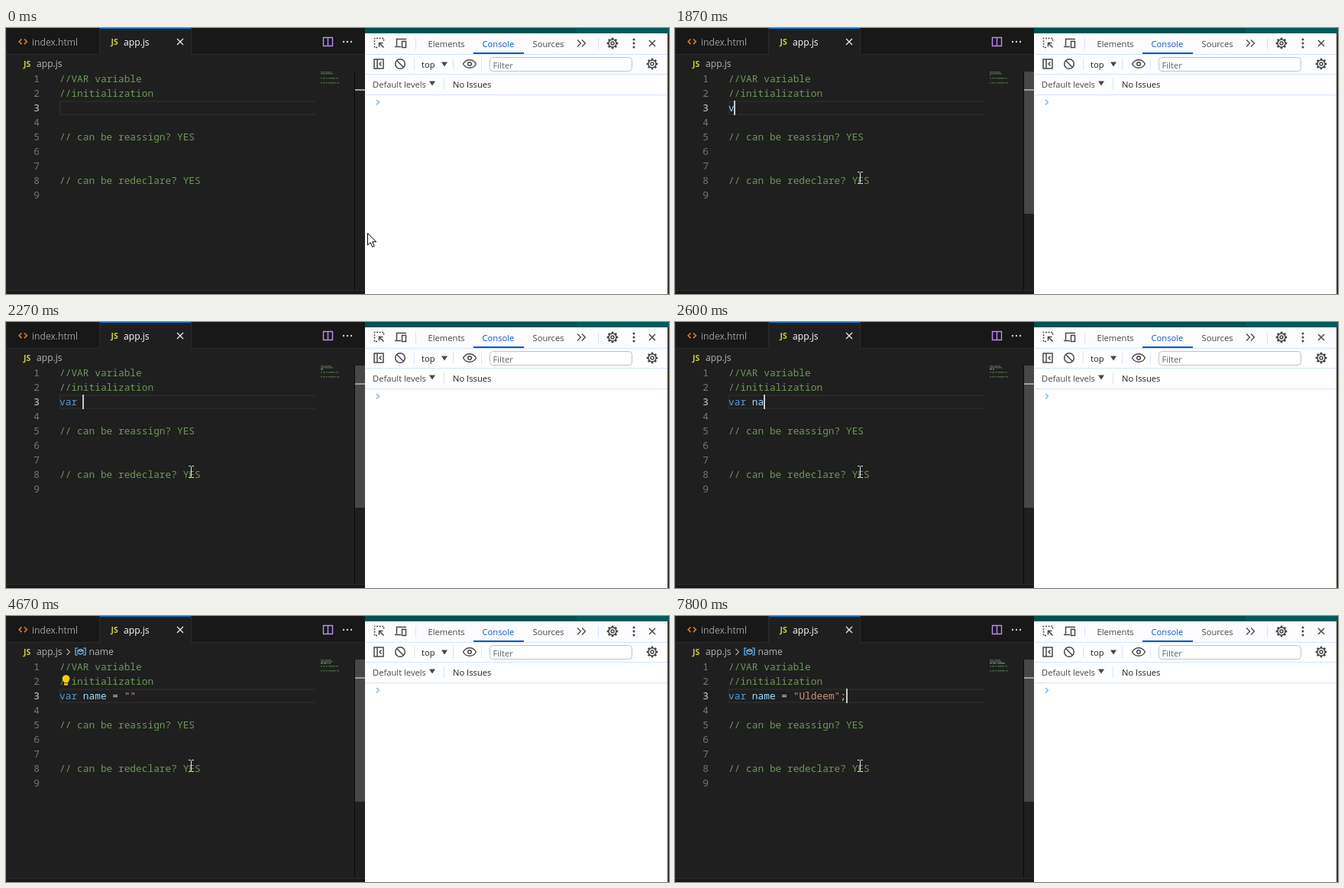
An HTML page with a canvas for the animation above (8 s loop, 868 by 348 pixels).

```html
<!DOCTYPE html>
<html lang="en">
<head>
<meta charset="utf-8">
<title>Typing a variable</title>
<style>
  html, body { margin: 0; height: 100%; overflow: hidden; background: #1f1f1f; }
  canvas { display: block; }
</style>
</head>
<body>
<canvas id="stage" width="868" height="348"></canvas>
<script>
const ctx = document.getElementById('stage').getContext('2d');
const LOOP = 8000, TICKS_PER_MS = 0.015;
const CHAR = 7.7, LEFT = 70, LINE = 19;
const MONO = '12.83px "Noto Sans Mono", monospace';
const UI = '12.1px "Open Sans", sans-serif';
const PANEL = '11.2px "Open Sans", sans-serif';

const COMMENTS = {
  1: '//VAR variable', 2: '//initialization',
  5: '// can be reassign? YES', 8: '// can be redeclare? YES'
};

// Typed line by tick; "|" is the visible caret.
const TYPING = [
  [0, ''], [16, '|'], [24, ''], [28, 'v|'], [30, 'va|'], [32, 'var|'], [34, 'var |'],
  [38, 'var n|'], [39, 'var na|'], [41, 'var nam|'], [44, 'var name|'], [49, 'var name |'],
  [52, 'var name =|'], [54, 'var name = |'], [61, 'var name = "|"'], [70, 'var name = ""'],
  [76, 'var name = "U|"'], [79, 'var name = "Ul|"'], [82, 'var name = "Uld|"'],
  [86, 'var name = "Ulde|"'], [90, 'var name = "Uldem|"'], [97, 'var name = "Uldem"'],
  [100, 'var name = "Ulde|"'], [103, 'var name = "Uldee|"'], [105, 'var name = "Uldeem|"'],
  [107, 'var name = "Uldeem"|'], [115, 'var name = "Uldeem"'], [117, 'var name = "Uldeem";|']
];

const within = (tick, from, to) => tick >= from && tick < to;

function rect(x, y, w, h, color) {
  ctx.fillStyle = color;
  ctx.fillRect(x, y, w, h);
}

function text(str, x, y, color, font = UI, align = 'left') {
  ctx.font = font;
  ctx.textAlign = align;
  ctx.fillStyle = color;
  ctx.fillText(str, x, y);
}

function stroke(path, color, width = 1.3) {
  ctx.strokeStyle = color;
  ctx.lineWidth = width;
  ctx.stroke(new Path2D(path));
}

function fill(path, color) {
  ctx.fillStyle = color;
  ctx.fill(new Path2D(path));
}

function disc(x, y, r, color) {
  ctx.fillStyle = color;
  ctx.beginPath();
  ctx.arc(x, y, r, 0, 7);
  ctx.fill();
}

function ring(x, y, r, color, width = 1.4) {
  ctx.strokeStyle = color;
  ctx.lineWidth = width;
  ctx.beginPath();
  ctx.arc(x, y, r, 0, 7);
  ctx.stroke();
}

function gear(x, y) {
  for (let i = 0; i < 8; i++) {
    const a = i * Math.PI / 4, c = Math.cos(a), s = Math.sin(a);
    stroke(`M${x + 5 * c} ${y + 5 * s}L${x + 7.3 * c} ${y + 7.3 * s}`, '#474747', 2.6);
  }
  ring(x, y, 5, '#474747', 1.5);
  ring(x, y, 2, '#474747', 1.5);
}

function drawTabs(tick) {
  rect(0, 0, 471, 348, '#1f1f1f');
  rect(0, 0, 470, 35, '#181818');
  rect(0, 34, 470, 1, '#2b2b2b');
  rect(122, 0, 121, 35, '#2b2b2b');
  rect(123, 0, 119, 35, '#1f1f1f');
  rect(123, 0, 119, 1, '#0078d4');
  stroke('M20.5 14.5l-3.3 3.3 3.3 3.3M24 14.5l3.3 3.3-3.3 3.3', '#e37933', 1.6);
  text('index.html', 34, 23, '#9d9d9d');
  const label = 'bold 10.5px "Open Sans", sans-serif';
  text('JS', 137.5, 21.5, '#cbcb41', label);
  text('app.js', 154, 23, within(tick, 62, 69) ? '#f88070' : '#ffffff');
  stroke('M224 14l8 8m0-8l-8 8', '#e8e8e8');
  stroke('M415.5 12.5h12v11h-12zM421.5 12.5v11', '#b98bf0', 1.4);
  for (const x of [442, 447, 452]) disc(x, 18, 1.2, '#cccccc');

  text('JS', 23, 50.5, '#cbcb41', label);
  text('app.js', 40, 51, '#b4b4b4');
  if (tick >= 69) {
    stroke('M79.5 43l4 4-4 4', '#a9a9a9', 1.1);
    stroke('M94 42h-3v9h3M101 42h3v9h-3M94 45l3.5-1.5 3.5 1.5v3.5l-3.5 1.5-3.5-1.5zM94 45l3.5 1.3 3.5-1.3', '#75beff', 1.2);
    text('name', 108.5, 51, '#b4b4b4');
  }
}

function tokenColor(token) {
  if (token === 'var') return '#569cd6';
  if (token[0] === '"') return '#ce9178';
  return /\w/.test(token) ? '#9cdcfe' : '#d4d4d4';
}

function drawMinimapLine(str, line, color) {
  ctx.globalAlpha = 0.6;
  [...str].forEach((c, i) => {
    if (c !== ' ') rect(412 + i, 57 + 2 * (line - 1), 0.9, 1.4, color);
  });
  ctx.globalAlpha = 1;
}

function drawPopup(height) {
  rect(9, 114, 432, height, '#454545');
  rect(10, 115, 430, height - 2, '#202020');
  rect(10, 115, 430, 21, '#04395e');
  ['var', 'void', 'VarDate', 'valueOf', 'variable'].forEach((word, i) => {
    const y = 126 + i * 21;
    stroke(`M16 ${y - 4}h9v8h-9z`, '#75beff', 1);
    text(word, 32, y + 4, '#cccccc', MONO);
  });
}

function drawCode(tick) {
  let state = '';
  for (const [start, value] of TYPING) if (tick >= start) state = value;
  const typed = state.replace('|', ''), caret = state.indexOf('|');

  rect(LEFT, 95, 335, 19, '#282828');
  rect(LEFT + 2, 97, 333, 15, '#1f1f1f');
  for (let n = 1; n <= 9; n++) {
    const y = 71 + LINE * (n - 1);
    text(n, 44, y, n === 3 ? '#cccccc' : '#6e7681', MONO, 'right');
    if (COMMENTS[n]) {
      text(COMMENTS[n], LEFT, y, '#6a9955', MONO);
      drawMinimapLine(COMMENTS[n], n, '#6a9955');
    }
  }
  for (const m of typed.matchAll(/"\w*"|\w+|[=;]/g)) {
    text(m[0], LEFT + m.index * CHAR, 109, tokenColor(m[0]), MONO);
  }
  drawMinimapLine(typed, 3, '#9cdcfe');
  if (caret >= 0) rect(Math.round(LEFT + caret * CHAR - 0.4), 95, 2, 19, '#c8c8c8');

  const hasError = within(tick, 59, 66);
  if (hasError) stroke('M144 112l2-2 2 2 2-2 2 2 2-2 2 2', '#f14c4c', 1);
  if (within(tick, 67, 111)) {
    disc(78.5, 82, 4.8, '#ffcc00');
    rect(76, 85, 5, 5.5, '#ffcc00');
    rect(76, 87.3, 5, 0.8, '#1f1f1f');
  }
  if (within(tick, 31, 34)) drawPopup(110);
  if (tick === 38) drawPopup(105);

  rect(456, 57, 1, 286, '#0a0a0a');
  if (tick >= 2) rect(457, 57, 13, 186, '#474747');
  rect(457, 80, 13, 2, '#a0a0a0');
  if (hasError) rect(465, 81, 5, 4, '#f14c4c');
  rect(0, 343, 470, 5, '#181818');
  rect(0, 343, 470, 1, '#2b2b2b');
  rect(0, 0, 1, 348, '#2b2b2b');
}

function drawDevtools() {
  const ink = '#474747', dark = '#1f1f1f', rule = '#d3e3fd';
  rect(470, 0, 398, 348, '#ffffff');
  rect(470, 0, 398, 7, '#005b5c');
  rect(470, 0, 277, 6, '#00504f');
  rect(471, 7, 395, 27, '#fcfcfe');
  for (const y of [34, 60, 87]) rect(471, y, 395, 1, rule);
  for (const [x, y] of [[536, 13], [775, 13], [534, 40], [585, 40], [622, 40], [573, 66]]) {
    rect(x, y, 1, 15, rule);
  }

  ctx.setLineDash([2, 1.6]);
  stroke('M486 25.5h-3.5v-12h12v4', ink, 1.5);
  ctx.setLineDash([]);
  stroke('M494.5 25.5l-6-6m0 5v-5h5', ink, 1.5);
  stroke('M524 14.5h-12.5v9M509 24.5h8M518.5 17.5h5v8h-5z', ink, 1.5);
  text('Elements', 552.5, 24.5, ink, PANEL);
  text('Console', 623.5, 24.5, '#0b57d0', PANEL);
  text('Sources', 689.5, 24.5, ink, PANEL);
  rect(612, 32, 66, 2, '#0b57d0');
  stroke('M748 15.5l4.5 4.5-4.5 4.5M754 15.5l4.5 4.5-4.5 4.5', ink);
  gear(794, 20);
  for (const y of [15, 20, 25]) disc(822, y, 1.5, ink);
  stroke('M842 16l8 8m0-8l-8 8', ink, 1.5);

  stroke('M482 41h12v12h-12zM486 41v12M491.5 44.5l-2.5 2.5 2.5 2.5', ink, 1.5);
  ring(516, 47, 6.3, ink, 1.5);
  stroke('M511.5 42.5l9 9', ink, 1.5);
  text('top', 544, 51.5, dark, PANEL);
  fill('M570 44.5h8l-4 6z', ink);
  stroke('M598.5 47c4-7 13-7 17 0c-4 7-13 7-17 0z', ink, 1.4);
  ring(607, 47, 2.3, ink, 1.5);
  ctx.strokeStyle = '#c0c2c6';
  ctx.lineWidth = 1;
  ctx.beginPath();
  ctx.roundRect(633.5, 38.5, 186, 18, 4);
  ctx.stroke();
  text('Filter', 637.5, 52.5, '#5f6368', PANEL);
  gear(846, 47);

  text('Default levels', 480, 78, ink, PANEL);
  fill('M554 69.5h8l-4 6z', ink);
  text('No Issues', 585, 78, dark, PANEL);
  stroke('M485 94l3.5 3.2-3.5 3.2', '#7cacf8', 1.3);
  rect(866, 7, 2, 341, '#3b3734');
}

function drawPointer(tick) {
  const ease = p => p * p * (3 - 2 * p);
  const mix = (a, b, p) => a + (b - a) * p;
  const toLine = ease(Math.min(tick / 12, 1));
  const away = ease(Math.min(Math.max((tick - 13) / 6, 0), 1));
  const x = mix(mix(473, 107, toLine), 242, away);
  const y = mix(mix(268, 104, toLine), 196, away);
  ctx.save();
  ctx.translate(Math.round(x), Math.round(y));
  if (x > 405) {
    const arrow = 'M.5.5v15.5l3.6-3.4 2.6 5.9 2.5-1.1-2.6-5.7h5z';
    fill(arrow, '#ffffff');
    stroke(arrow, '#000000', 1);
  } else {
    stroke('M-3-7.5h2.5l1 1 1-1h2.5M.5-6.5v13M-3 7.5h2.5l1-1 1 1h2.5', '#e6e6e6', 1);
  }
  ctx.restore();
}

let lastTick = -1;
function frame(now) {
  const tick = Math.floor((now % LOOP + 4) * TICKS_PER_MS);
  if (tick !== lastTick) {
    lastTick = tick;
    drawTabs(tick);
    drawCode(tick);
    drawDevtools();
    drawPointer(tick);
  }
  requestAnimationFrame(frame);
}
requestAnimationFrame(frame);
</script>
</body>
</html>
```
